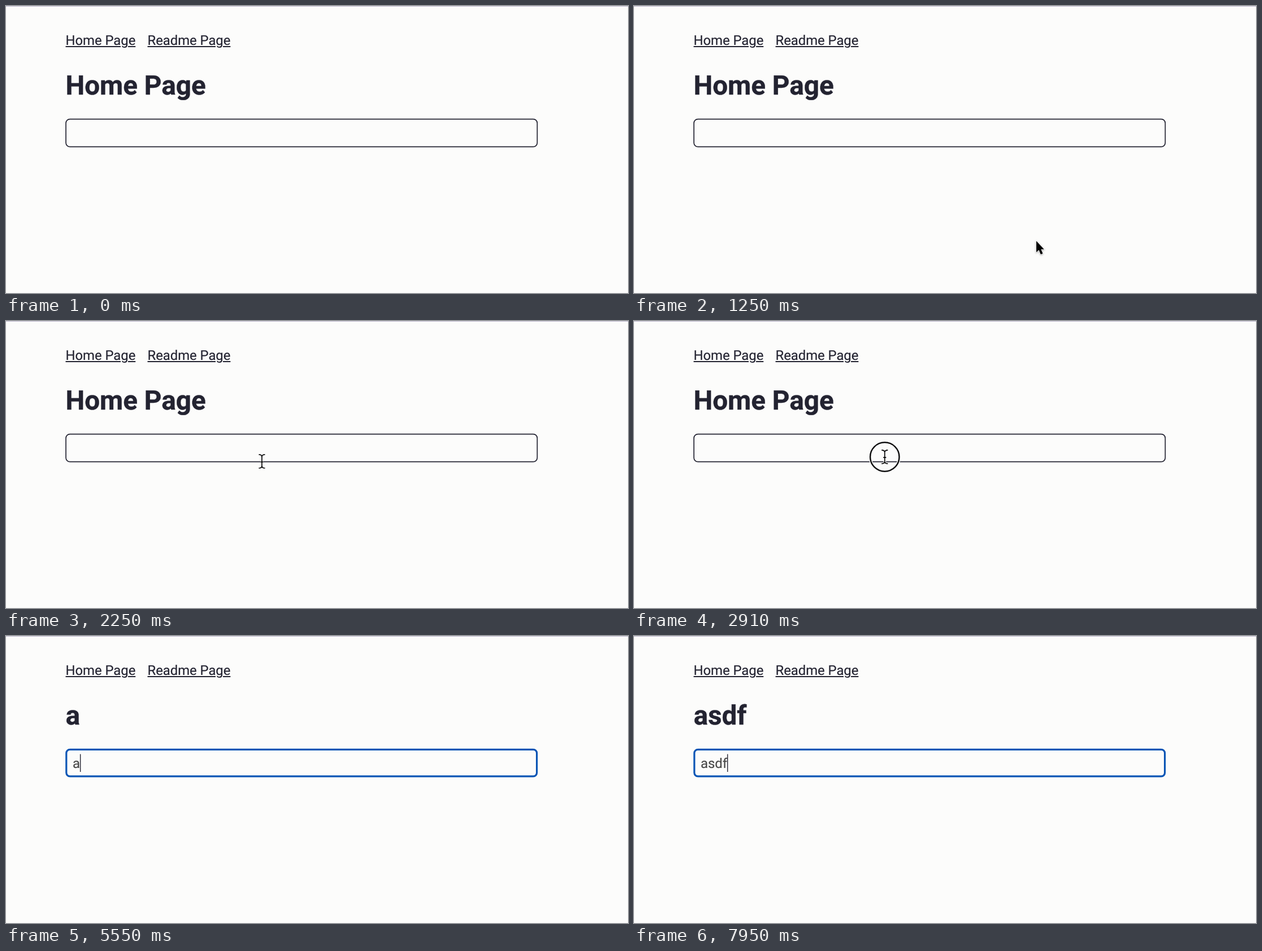
An HTML page that plays this animation: 1101x509 px, repeating every 8000 ms.

```html
<!DOCTYPE html>
<html lang="en">
<head>
<meta charset="utf-8">
<title>Home Page</title>
<style>
  html, body { margin: 0; width: 100%; height: 100%; overflow: hidden; background: #fcfcfb; }
  body { font: 23.8px/28px Roboto, sans-serif; color: #232331; text-rendering: geometricPrecision; }
  svg { display: block; fill: #232331; }
  .link { position: absolute; top: 47px; white-space: nowrap;
    -webkit-text-stroke: .2px; text-decoration: underline 2px; text-underline-offset: 2px; }
  #title { font-size: 47.6px; font-weight: 700; stroke: #232331; stroke-width: .4; }
  #value { fill: #484848; stroke: #484848; stroke-width: .2; }
  #box { fill: none; }
  #arrow { stroke: #fff; stroke-width: 1.4; paint-order: stroke; fill: #000;
    filter: drop-shadow(0 1.5px 1.5px #0005); }
  #beam path, #ring { fill: none; stroke: #111; stroke-width: 1.8; }
  #beam .halo { stroke: #fff; stroke-width: 4; }
  #ring circle { stroke-width: 2.5; }
  #ring .halo { stroke: #fff; stroke-width: 5; }
</style>
</head>
<body>
<span class="link" style="left: 105.5px">Home Page</span>
<span class="link" style="left: 250.5px">Readme Page</span>
<svg width="1101" height="509" viewBox="0 0 1101 509">
  <rect width="1101" height="1" fill="#bbb7cb"/>
  <text id="title" x="105.5" y="157"></text>
  <rect id="box"/>
  <text id="value" x="118" y="234"></text>
  <rect id="caret" y="209.5" width="1.4" height="31.5"/>
  <g id="pointer">
    <g id="ring">
      <circle class="halo" r="25.7"/>
      <circle r="25.7"/>
    </g>
    <path id="arrow" d="M.5 0V20L5 16 8.3 23.8 12 22.2 8.8 14.7H14.3Z"/>
    <g id="beam">
      <path class="halo" d="M-5-12Q0-12 0-8V8Q0 12-5 12M5-12Q0-12 0-8M0 8Q0 12 5 12M-2.5 1H2.5"/>
      <path d="M-5.5-12Q0-12 0-8V8Q0 12-5.5 12M5.5-12Q0-12 0-8M0 8Q0 12 5.5 12M-2.5 1H2.5"/>
    </g>
  </g>
</svg>
<script>
const LOOP = 8000, FOCUS = 3000;
const PRESS = [2830, 3070];
const KEYS = [5500, 6250, 7150, 7770];
// time, x, y
const PATH = [
  [850, 850, 515], [1250, 712, 417], [1700, 556, 316], [2050, 467, 259],
  [2250, 453, 249], [2390, 446, 242.5], [2490, 443.8, 241]
];
const $ = id => document.getElementById(id);
const show = (id, on) => $(id).setAttribute('visibility', on ? 'visible' : 'hidden');
const set = (id, attrs) => {
  for (const key in attrs) $(id).setAttribute(key, attrs[key]);
};

function pointerAt(t) {
  const i = PATH.findIndex(p => p[0] > t);
  if (i < 0) return PATH[PATH.length - 1].slice(1);
  if (i === 0) return PATH[0].slice(1);
  const [t0, x0, y0] = PATH[i - 1], [t1, x1, y1] = PATH[i];
  const k = (t - t0) / (t1 - t0);
  return [x0 + (x1 - x0) * k, y0 + (y1 - y0) * k];
}

function draw(t) {
  const typed = 'asdf'.slice(0, KEYS.filter(k => t >= k).length);
  const focused = t >= FOCUS;
  $('title').textContent = typed || 'Home Page';
  $('value').textContent = typed;

  const inset = focused ? 1.6 : 0.85;
  set('box', {
    x: 105.2 + inset, y: 199.7 + inset,
    width: 836 - 2 * inset, height: 50.8 - 2 * inset,
    rx: 8 - inset, stroke: focused ? '#0755b5' : '#232331', 'stroke-width': 2 * inset
  });
  show('caret', focused);
  set('caret', { x: 118 + (typed ? $('value').getComputedTextLength() : 0) });

  const [x, y] = pointerAt(t);
  const visible = t >= 850 && !typed;
  const overBox = y < 250;
  set('pointer', { transform: `translate(${x} ${y})` });
  show('arrow', visible && !overBox);
  show('beam', visible && overBox);
  show('ring', t >= PRESS[0] && t < PRESS[1]);
}

const start = performance.now();
function tick() {
  draw((performance.now() - start) % LOOP);
  requestAnimationFrame(tick);
}
tick();
</script>
</body>
</html>
```
